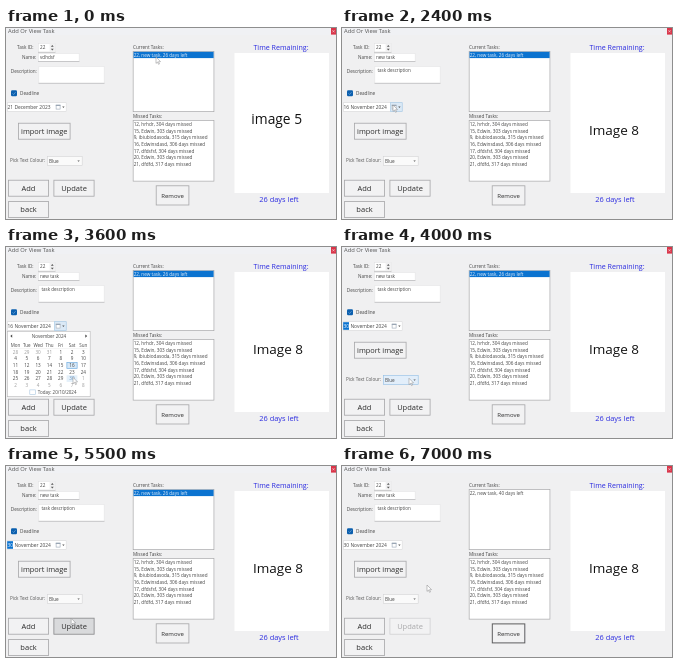
Animation of 330x191 px, one loop 7.1 s. Source, as an HTML page with a canvas:

```html
<!DOCTYPE html>
<html lang="en">
<head>
<meta charset="utf-8">
<title>Add Or View Task</title>
<style>
html, body { margin: 0; width: 100%; height: 100%; overflow: hidden; background: #f0f0f1; }
canvas { display: block; width: 330px; height: 191px; }
</style>
</head>
<body>
<canvas id="stage"></canvas>
<script>
const W = 330, H = 191, LOOP = 7100, STEP = 100;
const FONT = '"Open Sans", "Noto Sans", sans-serif';
const INK = '#444', BLUE = '#2b2be0', ACCENT = '#0b73d0', EDGE = '#a6a6a8';
const SMALL = 4.65, LARGE = 7.5;

const canvas = document.getElementById('stage');
const ctx = canvas.getContext('2d');
const ratio = window.devicePixelRatio || 1;
canvas.width = Math.round(W * ratio);
canvas.height = Math.round(H * ratio);
ctx.scale(ratio, ratio);

// Moments at which the window changes
const AT = {
  load: 100, dateHover: 2000, open: 2600, pick: 3800,
  comboOut: 4900, updateHover: 5100, save: 5700
};

// Pointer tip: time, x, y
const PATH = [
  [0, 150, 29], [700, 150, 29], [1100, 117, 62], [1600, 77, 84],
  [1800, 77, 84], [2000, 51, 77], [2700, 51, 77], [3000, 58, 96],
  [3500, 67, 130], [3800, 67, 131], [4500, 67, 132], [4700, 67, 132],
  [5200, 65, 152], [6900, 66, 154], [7000, 85, 119], [7100, 85, 119]
];

const MISSED = [
  '12, hrhdr, 304 days missed',
  '15, Edwin, 303 days missed',
  '9, ibiubiodasoda, 315 days missed',
  '16, Edwinsdasd, 306 days missed',
  '17, dfdsfsf, 304 days missed',
  '20, Edwin, 303 days missed',
  '21, dfdfd, 317 days missed'
];

// y is the middle of the capitals
function text(str, x, y, size = SMALL, color = INK, align = 'left') {
  ctx.font = `${size}px ${FONT}`;
  ctx.textAlign = align;
  ctx.fillStyle = color;
  ctx.fillText(str, x, y + size * 0.36);
}

function box(x, y, w, h, fill, border, line = 0.7) {
  ctx.fillStyle = fill;
  ctx.fillRect(x, y, w, h);
  if (!border) return;
  ctx.strokeStyle = border;
  ctx.lineWidth = line;
  ctx.strokeRect(x + line / 2, y + line / 2, w - line, h - line);
}

function poly(points, fill) {
  ctx.beginPath();
  points.forEach(([x, y]) => ctx.lineTo(x, y));
  ctx.closePath();
  ctx.fillStyle = fill;
  ctx.fill();
}

function polyline(points, color, width) {
  ctx.beginPath();
  points.forEach(([x, y]) => ctx.lineTo(x, y));
  ctx.strokeStyle = color;
  ctx.lineWidth = width;
  ctx.stroke();
}

function arrow(x, y, dir = 1, size = 1.4) {
  const half = dir * size * 0.6;
  poly([[x - size, y - half], [x + size, y - half], [x, y + half]], '#555');
}

function button(label, x, y, w, h, size = LARGE, look = {}) {
  box(x, y, w, h, look.fill || '#f2f2f3', look.border || EDGE, look.line || 0.8);
  text(label, x + w / 2, y + h / 2, size, look.ink || '#2c2c2c', 'center');
}

function field(x, y, w, h) {
  box(x, y, w, h, '#fff', '#e0e0e2', 0.6);
  ctx.fillStyle = '#b0b0b2';
  ctx.fillRect(x, y + h - 0.6, w, 0.6);
}

function drawForm(t) {
  const loaded = t >= AT.load;
  text('Task ID:', 11, 19.5);
  field(32, 15, 17.5, 9.5);
  text('22', 34, 19.6);
  box(43.6, 15.6, 5.4, 8.2, '#f0f0f1');
  arrow(46.3, 17.8, -1);
  arrow(46.3, 21.6);

  text('Name:', 16, 29);
  field(32, 25, 41.5, 9);
  text(loaded ? 'new task' : 'vdhdsf', 34, 29.2);

  text('Description:', 4.8, 43);
  field(32.5, 38, 66, 17.5);
  if (loaded) text('task description', 35.5, 42.6, 4.5);

  ctx.beginPath();
  ctx.roundRect(5, 62.3, 6, 6, 1.2);
  ctx.fillStyle = '#0b5fae';
  ctx.fill();
  polyline([[6.5, 65.4], [7.6, 66.5], [9.6, 64.2]], '#9cc4e8', 0.5);
  text('Deadline', 14, 65.4);
}

function drawDate(t) {
  const hover = t >= AT.dateHover && t < AT.pick;
  const focused = t >= AT.pick && t < AT.save;
  box(1, 74.4, 59.5, 9.2, '#fff', '#d6d6d8', 0.6);
  if (hover) box(48.3, 74.4, 12.2, 9.2, '#dbe9f6', '#a5c8e6', 0.6);
  if (focused) box(1.2, 75.2, 5.8, 7.6, ACCENT);

  const day = t < AT.load ? '21' : t < AT.pick ? '16' : '30';
  const month = t < AT.load ? 'December 2023' : 'November 2024';
  text(day, 1.5, 79.2, 4.9, focused ? '#fff' : INK);
  text(month, 8.4, 79.2, 4.9);

  box(49.8, 76.8, 4.6, 4.6, '#fff', '#9aa6b4', 0.6);
  ctx.fillStyle = '#9aa6b4';
  ctx.fillRect(49.8, 76.8, 4.6, 1.2);
  arrow(57.4, 79.2, 1, 1.2);
}

function drawCalendar(t) {
  if (t < AT.open || t >= AT.pick) return;
  box(1, 84, 83.5, 66, '#fff', '#b4b4b6', 0.6);
  poly([[6.2, 87.4], [6.2, 90.8], [4.3, 89.1]], '#444');
  poly([[79.3, 87.4], [79.3, 90.8], [81.2, 89.1]], '#444');
  text('November 2024', 43, 89, 4.6, INK, 'center');

  const colX = c => 9.5 + 11.3 * c;
  ['Mon', 'Tue', 'Wed', 'Thu', 'Fri', 'Sat', 'Sun']
    .forEach((name, c) => text(name, colX(c), 98, 4.5, INK, 'center'));
  polyline([[4, 101.6], [81.5, 101.6]], '#e8e8e8', 0.5);

  const [px, py] = pointer(t);
  for (let i = 0; i < 42; i++) {
    const n = i - 3;
    const x = colX(i % 7), y = 105.2 + 6.6 * Math.floor(i / 7);
    const inMonth = n >= 1 && n <= 30;
    const label = n < 1 ? n + 31 : n > 30 ? n - 30 : n;
    const hover = Math.abs(px - x) < 5.7 && Math.abs(py - y) < 3.3;
    if (n === 16) box(x - 5.4, y - 3.3, 10.8, 6.6, '#d6e8f8', '#6aa9de', 0.6);
    else if (hover) box(x - 5.4, y - 3.3, 10.8, 6.6, '#e4f0fa');
    const ink = hover ? '#5f8fbd' : inMonth ? INK : '#999';
    text(String(label), x, y, 4.6, ink, 'center');
  }
  box(23.5, 142.6, 6.5, 5.2, '#fff', '#a9c6e0', 0.6);
  text('Today: 20/10/2024', 31.8, 145.3, 4.5);
}

function drawControls(t) {
  button('import image', 12, 94.8, 52.5, 16.8, 7.4);

  text('Pick Text Colour:', 4, 132.5, 4.6, '#555');
  const comboHover = t >= AT.pick && t < AT.comboOut;
  box(41, 128.2, 35.5, 9.4, comboHover ? '#e2eefa' : '#fafafa', comboHover ? '#93bfe4' : '#d2d2d4', 0.6);
  text('Blue', 43, 133, 4.7);
  arrow(72.6, 133.1, 1, 1.2);

  button('Add', 2, 151.8, 41, 16.8);
  const saved = t >= AT.save;
  const look = saved ? { border: '#d0d0d2', ink: '#a8a8aa' }
    : t >= AT.updateHover ? { fill: '#d9dadc', border: '#8a8a8c' } : {};
  button('Update', 47.5, 151.8, 41, 16.8, LARGE, look);
  button('back', 2, 173.2, 41, 16.6);
  button('Remove', 149.8, 157.4, 33.5, 20, 6, saved ? { border: '#5c5c5e', line: 1 } : {});
}

function drawLists(t) {
  const saved = t >= AT.save;
  text('Current Tasks:', 127, 19.2);
  box(126.8, 23, 81.5, 61, '#fff', EDGE, 0.7);
  if (!saved) box(127.5, 23.8, 80.1, 6.3, ACCENT);
  text(`22, new task, ${saved ? 40 : 26} days left`, 127.7, 27, SMALL, saved ? INK : '#e4effa');

  text('Missed Tasks:', 127, 88.8);
  box(126.8, 92, 81.5, 61.5, '#fff', EDGE, 0.7);
  MISSED.forEach((row, i) => text(row, 127.7, 96.5 + 6.6 * i));
}

function drawPreview(t) {
  text('Time Remaining:', 275, 19.3, 7.1, BLUE, 'center');
  box(228.5, 25, 94.5, 140, '#fff');
  if (t < AT.load) text('image 5', 270.7, 91, 13.8, '#111', 'center');
  else text('Image 8', 272, 102, 13.5, '#111', 'center');
  text('26 days left', 273, 171.6, 7.4, BLUE, 'center');
}

function pointer(t) {
  const i = PATH.findIndex(p => p[0] > t);
  const [t0, x0, y0] = PATH[i - 1], [t1, x1, y1] = PATH[i];
  const k = (t - t0) / (t1 - t0);
  return [x0 + (x1 - x0) * k, y0 + (y1 - y0) * k];
}

function drawPointer(t) {
  const [x, y] = pointer(t);
  const shape = [[0, 0], [0, 6.4], [1.5, 5], [2.5, 7.3], [3.5, 6.9], [2.5, 4.7], [4.5, 4.6]]
    .map(([dx, dy]) => [x + dx, y + dy]);
  poly(shape, '#fff');
  polyline([...shape, shape[0]], '#858587', 0.5);
}

function drawTitleBar() {
  box(0, 0, W, 7, '#f0f1f4');
  text('Add Or View Task', 2, 3.2, 5.8, '#555');
  box(325, 0, 5, 6.6, '#d9364a');
  polyline([[326.4, 2.2], [328.6, 4.4]], '#fff', 0.5);
  polyline([[328.6, 2.2], [326.4, 4.4]], '#fff', 0.5);
}

function draw(t) {
  box(0, 0, W, H, '#f0f0f1');
  drawTitleBar();
  drawForm(t);
  drawDate(t);
  drawLists(t);
  drawPreview(t);
  drawControls(t);
  drawCalendar(t);
  drawPointer(t);
}

const start = performance.now();
function tick() {
  const t = (performance.now() - start) % LOOP;
  draw(Math.floor(t / STEP) * STEP);
  requestAnimationFrame(tick);
}
tick();
</script>
</body>
</html>
```
